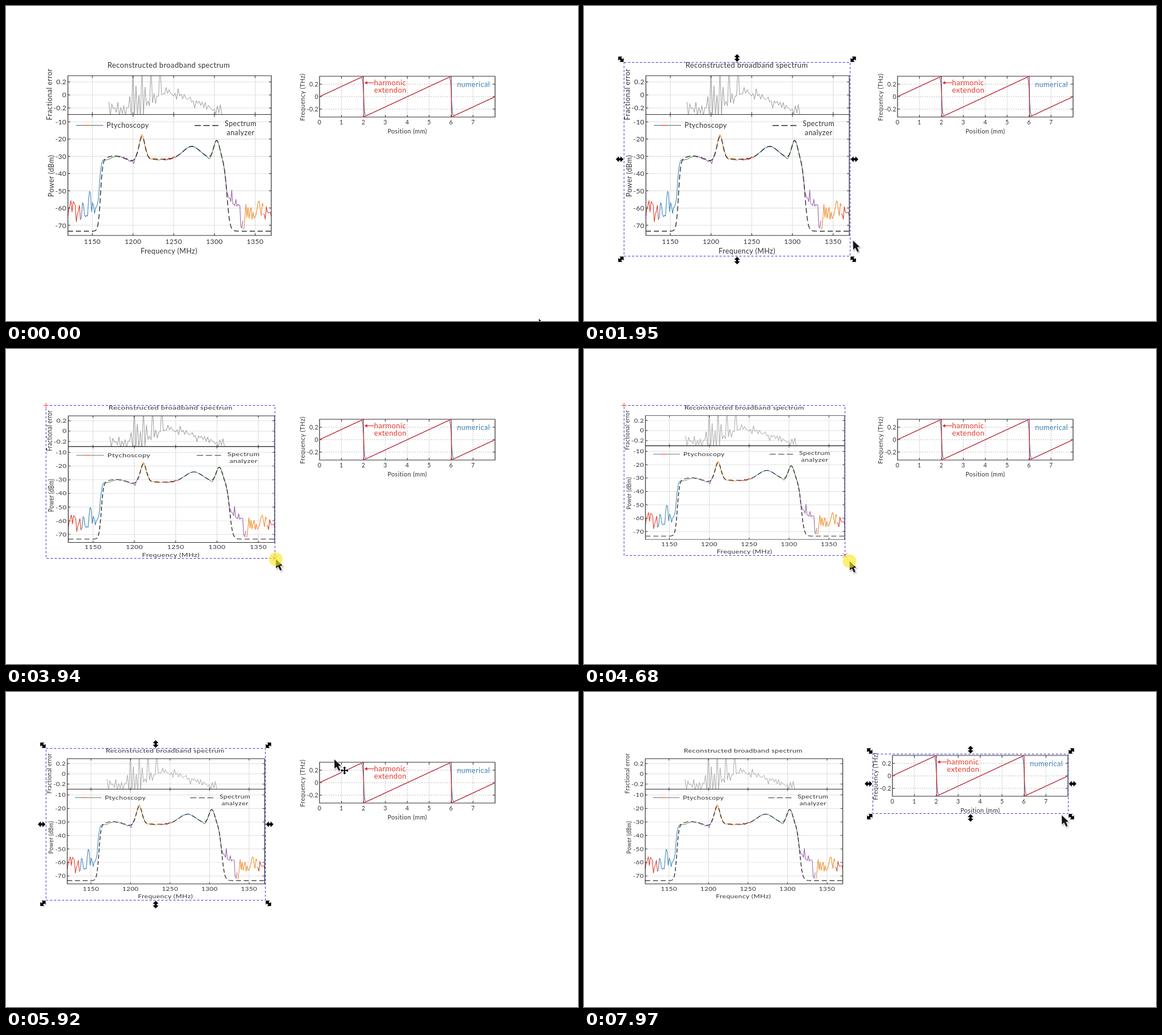
An HTML page for the animation above (8000 ms loop, 1007x556 px).

```html
<!DOCTYPE html>
<html lang="en">
<head>
<meta charset="utf-8">
<title>Resizing plots</title>
<style>
html, body { margin: 0; width: 100%; height: 100%; overflow: hidden; background: #fff; }
svg { display: block; width: 100%; height: 100%; }
text { font-family: Lato, "Open Sans", sans-serif; fill: #333; letter-spacing: .42px; }
path { fill: none; }
</style>
</head>
<body>
<svg id="stage" viewBox="0 0 1007 556" preserveAspectRatio="none">
  <defs>
    <clipPath id="errorClip"><rect x="109" y="123" width="358" height="68"/></clipPath>
    <filter id="shade" x="-50%" y="-50%" width="220%" height="220%">
      <feDropShadow dx="1" dy="1.5" stdDeviation="1" flood-opacity=".35"/>
    </filter>
  </defs>
  <g id="spectrum"></g>
  <g id="sawtooth"></g>
  <rect id="outline" fill="none" stroke="#3434da" stroke-dasharray="4 3"/>
  <g id="handles"></g>
  <path id="anchor" d="M66 99.5h9M70.5 95v9" stroke="#ee4438"/>
  <path id="corner" d="M-4-4 4 4M-4 4 4-4" stroke="#ee4438"/>
  <g id="pointer">
    <path d="M0 0 .4 16.2 4.2 12.9 7.6 20 10.5 18.7 7.3 11.8 12 11.2Z" style="fill:#141414"
      stroke="#fff" stroke-width="1.6" paint-order="stroke" filter="url(#shade)"/>
    <path id="moveIcon" transform="translate(18 19.5)" style="fill:#000" stroke="#fff" stroke-width="2" paint-order="stroke"
      d="M0-7 3-4H1V-1H4V-3L7 0 4 3V1H1V4H3L0 7-3 4H-1V1H-4V3L-7 0-4-3V-1H-1V-4H-3Z"/>
    <circle id="press" r="12" fill="#f7ea28" opacity=".65"/>
  </g>
</svg>
<script>
const $ = id => document.getElementById(id);
const INK = '#2a2a2a';
const BLUE = '#3f86b9', RED = '#e53a2b', GREEN = '#628a5c', PURPLE = '#9a62a8', ORANGE = '#f08a28', CRIMSON = '#d8232a';

const path = (d, stroke, width = 1, extra = '') =>
  `<path d="${d}" stroke="${stroke}" stroke-width="${width}" stroke-linejoin="round" ${extra}/>`;
const label = (s, x, y, size = 12.5, anchor = 'middle', color = '#333') =>
  `<text x="${x}" y="${y}" font-size="${size}" text-anchor="${anchor}" style="fill:${color}">${s}</text>`;
const upright = (s, x, y, size) => `<g transform="translate(${x} ${y}) rotate(-90)">${label(s, 0, 0, size)}</g>`;
const steps = (n, from, gap) => Array.from({ length: n }, (_, i) => from + i * gap);

function plot(f, x0, x1, step, ...style) {
  const n = Math.round((x1 - x0) / step);
  const pts = steps(n + 1, x0, (x1 - x0) / n).map((x, i) => x.toFixed(1) + ' ' + f(x, i).toFixed(1));
  return path('M' + pts.join('L'), ...style);
}

let seed = 7;
const noise = size => ((seed = seed * 16807 % 2147483647) / 2147483647 * 2 - 1) * size;
const bump = (x, center, width, height) => height * Math.exp(-(((x - center) / width) ** 2));
const rise = (x, center, width) => 1 / (1 + Math.exp((center - x) / width));

// A plateau with two sharp peaks and a hump, between two steep edges
function power(x) {
  const top = 270.5 - bump(x, 191, 16, 6) + bump(x, 221, 7, 3)
    - bump(x, 239.5, 7.5, 40) - bump(x, 327, 22, 22.5) - bump(x, 371, 7.5, 33);
  return 397.5 - (397.5 - top) * rise(x, 166.3, 1.9) * (1 - rise(x, 389, 2.6));
}
function measured(x) {
  const floor = 364 - bump(x, 113, 5, 16) - bump(x, 147, 3, 24) - bump(x, 390, 12, 36)
    + bump(x, 416, 4, 20) - bump(x, 445, 3, 34) + noise(17);
  const signal = power(x < 174 ? x + 3 : x) + bump(x, 181, 9, 4) + bump(x, 225, 2, 5)
    - bump(x, 239, 2, 5) + bump(x, 358, 3, 4) + noise(x > 200 && x < 300 ? 2 : .7);
  return Math.min(floor, signal);
}
// Zigzag that is widest left of the centre, with regular spikes out of range
function fraction(x, i) {
  if (i % 6 === 4 && x > 215 && x < 275) return 105;
  const middle = 182 - bump(x, 285, 50, 29);
  const swing = 7 + bump(x, 228, 28, 15) + bump(x, 372, 12, 6);
  return middle + (i % 2 ? 1 : -1) * swing * .6 + noise(swing);
}

function axes(x0, y0, x1, y1, xs, ys) {
  const ticks = xs.map(x => `M${x} ${y0}v4M${x} ${y1}v-4`).join('') + ys.map(y => `M${x0} ${y}h4M${x1} ${y}h-4`).join('');
  return path(ticks, INK) + path(`M${x0} ${y0}H${x1}V${y1}H${x0}Z`, INK, 1.2);
}
const grid = (x0, y0, x1, y1, xs, ys, ...style) =>
  path(xs.map(x => `M${x} ${y0}V${y1}`).join('') + ys.map(y => `M${x0} ${y}H${x1}`).join(''), ...style);
const errorTicks = (ys, x, size) =>
  ys.map((y, i) => label(['0.2', '0', '-0.2'][i], x, y + size * .37, size, 'end')).join('');

function drawSpectrum() {
  const xs = steps(5, 152, 71.65), ys = steps(7, 204.5, 30.42), errorYs = steps(3, 134, 23);
  const bands = [[109, RED], [131, BLUE], [172, GREEN], [202, PURPLE], [232, ORANGE], [276, RED],
    [303, BLUE], [348, GREEN], [385, PURPLE], [417, ORANGE], [453, RED], [467]];

  let out = grid(109, 123, 467, 405, xs, [...errorYs, ...ys], '#e0e0e0', 1.2);
  out += plot(fraction, 181, 380, 2.65, '#9c9c9c', 1, 'clip-path="url(#errorClip)"');
  bands.slice(0, -1).forEach(([x, color], i) => out += plot(measured, x, bands[i + 1][0], 1.8, color, 1.1));
  out += plot(power, 109, 467, 1, INK, 1.4, 'stroke-dasharray="9 5"');
  out += axes(109, 123, 467, 191.5, xs, errorYs) + axes(109, 191.5, 467, 405, xs, ys);

  [BLUE, RED, GREEN, PURPLE].forEach((c, i) => out += path(`M${123 + 12 * i} 210.7h12`, c, 1.3));
  out += path('M332 211h42', INK, 1.4, 'stroke-dasharray="11 4.5"');
  out += label('Ptychoscopy', 177, 215, 12.5, 'start') + label('Spectrum', 413, 212) + label('analyzer', 413, 228);
  xs.forEach((x, i) => out += label(1150 + 50 * i, x, 420, 12));
  ys.forEach((y, i) => out += label(-10 * (i + 1), 106.5, y + 4.5, 12, 'end'));
  out += errorTicks(errorYs, 106.5, 12);
  out += label('Reconstructed broadband spectrum', 286.5, 109, 12.9) + label('Frequency (MHz)', 287, 437);
  return out + upright('Fractional error', 80.5, 156) + upright('Power (dBm)', 83.5, 300);
}

function drawSawtooth() {
  const xs = steps(7, 590.6, 38.6), ys = steps(3, 138, 22);
  const saw = soft => x => 160 - 36 * ((x - 552) / 77.3 - 2 * rise(x, 629.6, soft) - 2 * rise(x, 784.2, soft));
  let out = grid(552, 124, 861, 196, xs, ys, '#a6a6a6', 1, 'stroke-dasharray="1.5 2.5"');
  out += axes(552, 124, 861, 196, xs, ys);
  out += plot(saw(.9), 552, 861, .5, BLUE, 1.1) + plot(saw(.1), 552, 861, .5, CRIMSON, 1.2);
  out += path('M648 135.5H634', CRIMSON) + `<path d="M631 135.5l5-2.8v5.6z" style="fill:${CRIMSON}"/>`;
  out += label('harmonic', 648, 140, 13, 'start', RED) + label('extendon', 648, 153, 13, 'start', RED);
  out += label('numerical', 794, 143, 12.7, 'start', BLUE);
  [552, ...xs].forEach((x, i) => out += label(i, x, 209, 10.5));
  out += errorTicks(ys, 550, 10.5);
  return out + label('Position (mm)', 706.5, 225, 10.8) + upright('Frequency (THz)', 526, 161, 10.8);
}

$('spectrum').innerHTML = drawSpectrum();
$('sawtooth').innerHTML = drawSawtooth();

const arrow = '<path d="M-6.7 0-1.5-5.2V-2H1.5V-5.2L6.7 0 1.5 5.2V2H-1.5V5.2Z" style="fill:#000"/>';
const sides = [];
for (const dx of [-1, 0, 1]) for (const dy of [-1, 0, 1]) if (dx || dy) sides.push([dx, dy]);
$('handles').innerHTML = sides.map(() => arrow).join('');

// Moves: start, end, x, y
const pointerMoves = [
  [70, 560, 346, 367], [560, 730, 438, 400], [1190, 1950, 473.5, 414], [2020, 2580, 474, 447],
  [3050, 3320, 481, 426], [3320, 3940, 475, 371], [3940, 4680, 467.5, 374.5], [4900, 5520, 573, 127],
  [5520, 5590, 569, 109], [5770, 5920, 578, 119], [6100, 7060, 569, 107], [7260, 7970, 841, 217.5]
];
const resizeMoves = [
  [3050, 3320, 469, 435], [3320, 3940, 474, 370], [3940, 4680, 460, 364], [4680, 4980, 456.5, 367]
];

function follow(moves, from, t) {
  let [x, y] = from;
  for (const [start, end, toX, toY] of moves) {
    if (t < start) break;
    const u = Math.min(1, (t - start) / (end - start)), ease = u * u * (3 - 2 * u);
    x += (toX - x) * ease;
    y += (toY - y) * ease;
  }
  return [x, y];
}
const pointerAt = t => follow(pointerMoves, [938, 552], t);
const within = (t, ...spans) => spans.some(([a, b]) => t >= a && t < b);
const show = (id, on) => $(id).setAttribute('visibility', on ? 'visible' : 'hidden');
const move = (el, x, y, rest = '') => el.setAttribute('transform', `translate(${x} ${y}) ${rest}`);

function render(t) {
  const [px, py] = pointerAt(t);
  const [rx, ry] = follow(resizeMoves, [468, 441], t);
  const grab = pointerAt(6100), drop = pointerAt(Math.min(7060, Math.max(6100, t)));
  const dx = drop[0] - grab[0], dy = drop[1] - grab[1];
  move($('spectrum'), 70, 99, `scale(${(rx - 70) / 398} ${(ry - 99) / 342}) translate(-70 -99)`);
  move($('sawtooth'), dx, dy);
  move($('pointer'), px, py);

  const box = t >= 6100 ? [517.5 + dx, 121 + dy, 861.5 + dx, 226 + dy] : [70, 99, rx, ry];
  const [x0, y0, x1, y1] = box.map(v => Math.floor(v) + .5);
  const frame = { x: x0, y: y0, width: x1 - x0, height: y1 - y0 };
  for (const k in frame) $('outline').setAttribute(k, frame[k]);
  [...$('handles').children].forEach((el, i) => {
    const [sx, sy] = sides[i], gap = sx && sy ? 5.5 : 7.7;
    const angle = sx && sy ? 45 * sx * sy : sx ? 0 : 90;
    move(el, (x0 + x1) / 2 + sx * ((x1 - x0) / 2 + gap), (y0 + y1) / 2 + sy * ((y1 - y0) / 2 + gap), `rotate(${angle})`);
  });
  move($('corner'), x1, y1);

  const resizing = within(t, [3050, 4980]);
  show('outline', t >= 1190);
  show('handles', within(t, [1190, 3050], [4980, 6100], [7260, 8000]));
  show('anchor', resizing);
  show('corner', resizing);
  show('press', resizing || within(t, [1050, 1190], [6100, 7260]));
  show('moveIcon', within(t, [5500, 5590], [5840, 6100]));
}

const start = performance.now();
function tick() {
  render((performance.now() - start) % 8000);
  requestAnimationFrame(tick);
}
tick();
</script>
</body>
</html>
```
